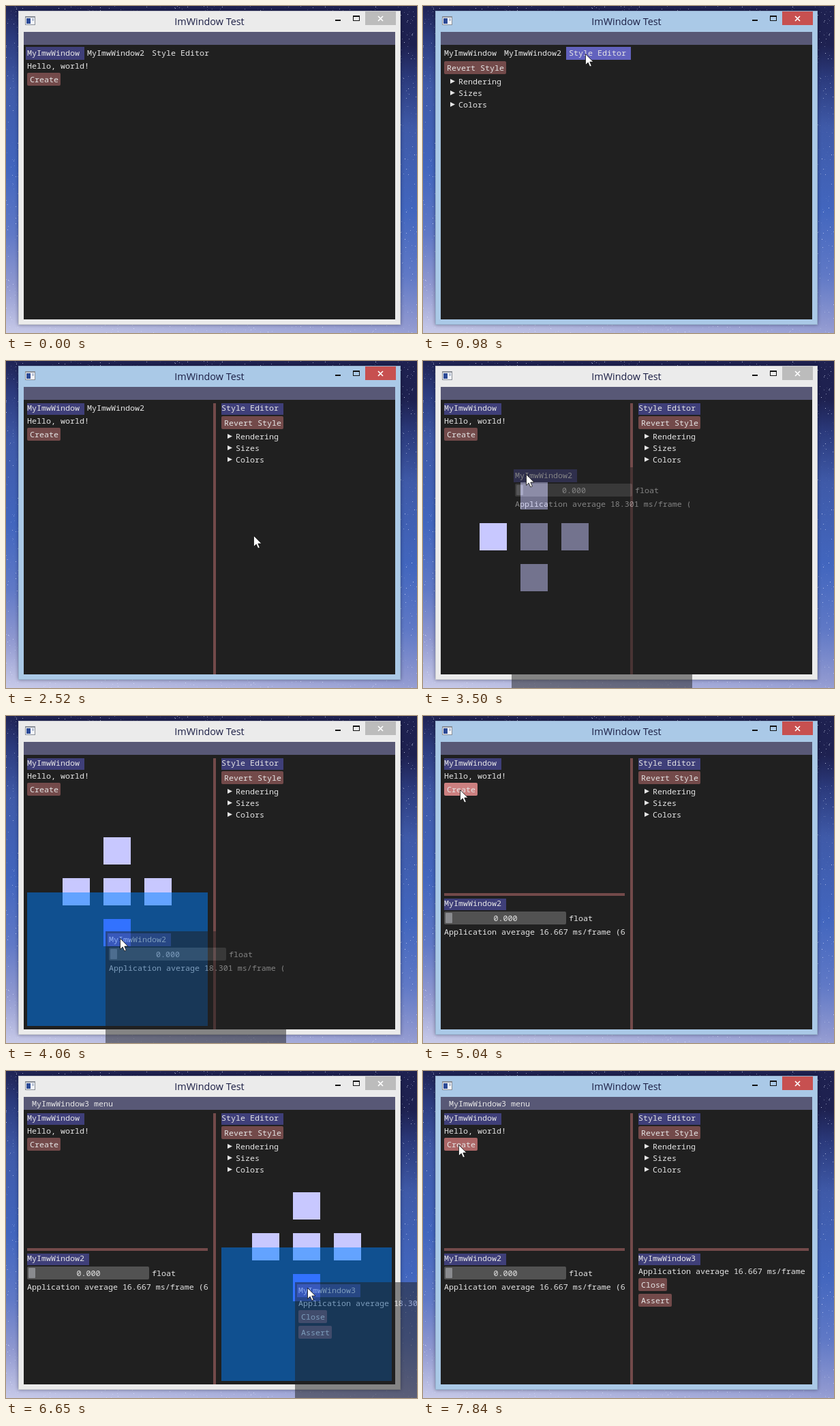
Animation of 603 by 480 pixels, one loop 8000 ms. Source, as an HTML page with a canvas:

```html
<!DOCTYPE html>
<html lang="en">
<head>
<meta charset="utf-8">
<title>ImWindow Test</title>
<style>
  html, body { margin: 0; width: 100%; height: 100%; overflow: hidden; background: #3d5fb8; }
  canvas { display: block; }
</style>
</head>
<body>
<canvas id="stage" width="603" height="480"></canvas>
<script>
const W = 603, H = 480, LOOP = 8000, STEP = 70, CHAR = 7;
const COLOR = {
  body: '#202020', menu: '#585876', text: '#e6e6e6', bar: '#734a4a',
  button: ['#734a4a', '#ab6666', '#cc8080'],
  tab: ['#3f3f79', '#6262be', '#7272b8'],
  slider: '#525252', grab: '#8a8b8f', guide: '#c8c8ff', guideHot: '#6464ff'
};
const MONO = '11.667px "Noto Sans Mono", "Liberation Mono", monospace';
const SANS = '14.4px "Open Sans", "Noto Sans", sans-serif';

const stage = document.getElementById('stage').getContext('2d');
const newLayer = () => Object.assign(document.createElement('canvas'), { width: W, height: H }).getContext('2d');
const layer = newLayer();
const sky = paintSky(newLayer());
let ctx = stage, cursor = null, pressed = false;

// Pointer path: time, x, y
const PATH = [
  [70, 186, 68], [140, 178, 68], [420, 178, 68], [700, 238, 70], [1050, 238, 70], [1260, 258, 70],
  [1400, 258, 70], [1750, 359, 160], [2170, 363, 256], [2660, 363, 256], [3150, 140, 69],
  [3290, 140, 69], [3850, 168, 328], [3920, 168, 328], [4060, 167, 326], [4550, 167, 326],
  [4970, 54, 108], [5250, 54, 108], [5740, 166, 110], [5810, 168, 111], [5880, 190, 135],
  [6020, 320, 260], [6090, 345, 276], [6650, 442, 318], [6790, 442, 318], [7350, 52, 117],
  [7700, 52, 117], [7840, 52, 108], [8000, 52, 108]
];

const between = (t, a, b) => t >= a && t < b;

function pointerAt(t) {
  const i = PATH.findIndex(p => p[0] > t);
  if (i < 1) return null;
  const [t0, x0, y0] = PATH[i - 1], [t1, x1, y1] = PATH[i];
  const k = (t - t0) / (t1 - t0);
  return { x: Math.round(x0 + (x1 - x0) * k), y: Math.round(y0 + (y1 - y0) * k) };
}

function paintSky(c) {
  let seed = 7;
  const random = () => (seed = seed * 16807 % 2147483647) / 2147483647;
  const g = c.createLinearGradient(50, 0, 0, H);
  [[0, '#1e2150'], [.1, '#2b3a7c'], [.25, '#3f5aa8'], [.5, '#4266be'], [.7, '#6079c6'],
   [.85, '#8f98d0'], [1, '#c8cae8']].forEach(s => g.addColorStop(...s));
  c.fillStyle = g;
  c.fillRect(0, 0, W, H);
  for (let i = 0; i < 9000; i++) {
    const x = random() * W, y = random() * H;
    c.fillStyle = `rgba(225,232,255,${random() ** 4 * .8})`;
    c.fillRect(x | 0, y | 0, 1, 1);
  }
  return c.canvas;
}

function rect(x, y, w, h, color, radius = 0) {
  ctx.fillStyle = color;
  ctx.beginPath();
  ctx.roundRect(x, y, w, h, radius);
  ctx.fill();
}

function text(s, x, y, color = COLOR.text) {
  ctx.font = MONO;
  ctx.fillStyle = color;
  ctx.fillText(s, x, y + 4);
}

function poly(points, color) {
  ctx.fillStyle = color;
  ctx.beginPath();
  points.forEach(p => ctx.lineTo(...p));
  ctx.closePath();
  ctx.fill();
}

// Draws a group on its own layer, then blends it as a whole.
function blended(alpha, draw) {
  layer.clearRect(0, 0, W, H);
  ctx = layer;
  draw();
  ctx = stage;
  ctx.globalAlpha = alpha;
  ctx.drawImage(layer.canvas, 0, 0);
  ctx.globalAlpha = 1;
}

const inside = (x, y, w, h) => cursor &&
  cursor.x >= x && cursor.x < x + w && cursor.y >= y && cursor.y < y + h;
const heat = (...box) => inside(...box) ? (pressed ? 2 : 1) : 0;

function button(label, x, y) {
  const box = [x, y - 10, label.length * CHAR + 7, 19];
  rect(...box, COLOR.button[heat(...box)], 2);
  text(label, x + 4, y);
}

const average = rate => `Application average ${rate} FPS)`;

// Each window body starts at the text position of its tab.
const WINDOWS = {
  MyImwWindow(x, y) {
    text('Hello, world!', x, y + 19);
    button('Create', x, y + 39);
  },
  MyImwWindow2(x, y, w, rate) {
    const sw = Math.round(w * .65);
    rect(x, y + 12, sw, 19, COLOR.slider, 2);
    rect(x + 2, y + 14, 10, 15, COLOR.grab, 1);
    text('0.000', x + sw / 2 - 17, y + 22);
    text('float', x + sw + 4, y + 22);
    text(average(rate), x, y + 42);
  },
  'Style Editor'(x, y) {
    button('Revert Style', x, y + 22);
    ['Rendering', 'Sizes', 'Colors'].forEach((name, i) => {
      const cy = y + 42 + i * 17;
      poly([[x + 9, cy - 4], [x + 16, cy - .5], [x + 9, cy + 3]], COLOR.text);
      text(name, x + 21, cy);
    });
  },
  MyImwWindow3(x, y, w, rate) {
    text(average(rate), x, y + 19);
    button('Close', x, y + 39);
    button('Assert', x, y + 62);
  }
};

function pane(x, y, w, h, tabs, selected, { loose = false, held = false, rate = '16.667 ms/frame (60.0' } = {}) {
  const inset = loose ? 3 : 5;
  ctx.save();
  ctx.beginPath();
  ctx.rect(x + inset, y + inset, w - inset - 4, h - inset);
  ctx.clip();
  let tx = x + 5;
  const ty = y + 12;
  for (const name of tabs) {
    const width = name.length * CHAR + 7;
    const box = [tx - 4, ty - 9, width + 4, 19];
    const level = held ? 2 : heat(...box);
    if (name === selected || level) rect(...box, COLOR.tab[level]);
    text(name, tx, ty);
    tx += width + 4;
  }
  WINDOWS[selected](x + 5, ty, w, rate);
  ctx.restore();
}

function frame(x, y, w, h, title, active) {
  const r = x + w;
  ctx.save();
  ctx.shadowColor = 'rgba(0,0,20,.4)';
  ctx.shadowBlur = 5;
  rect(x, y, w, h, active ? '#aac9e7' : '#ebebeb');
  ctx.restore();
  ctx.strokeStyle = 'rgba(60,70,90,.2)';
  ctx.strokeRect(x + .5, y + .5, w - 1, h - 1);
  // Generic window icon
  rect(x + 10, y + 8, 15, 13, '#8a8f98');
  rect(x + 11, y + 10, 13, 10, '#f4f6fa');
  rect(x + 12, y + 11, 6, 8, '#2c4a96');
  rect(x + 20, y + 11, 3, 4, '#b9c2d4');
  ctx.font = SANS;
  ctx.textAlign = 'center';
  ctx.fillStyle = '#1c1f45';
  ctx.fillText(title, x + w / 2, y + 21);
  ctx.textAlign = 'left';
  rect(r - 96, y + 13, 8, 2, '#111');
  ctx.strokeStyle = '#111';
  ctx.strokeRect(r - 69.5, y + 7.5, 9, 7);
  rect(r - 70, y + 7, 10, 2, '#111');
  rect(r - 52, y + 1, 45, 20, active ? '#c75050' : '#bcbcbc');
  ctx.strokeStyle = '#fff';
  ctx.lineWidth = 1.7;
  ctx.beginPath();
  for (const d of [-1, 1]) {
    ctx.moveTo(r - 29.5 - 3.5 * d, y + 8);
    ctx.lineTo(r - 29.5 + 3.5 * d, y + 15);
  }
  ctx.stroke();
  ctx.lineWidth = 1;
  rect(x + 8, y + 31, w - 16, h - 39, COLOR.body);
}

function guides(x, y, w, h) {
  const cx = Math.floor(x + w / 2), cy = Math.floor(y + h / 2);
  let target = null;
  for (const [dx, dy] of [[0, 0], [0, -1], [0, 1], [-1, 0], [1, 0]]) {
    const box = [cx + dx * 60 - 20, cy + dy * 60 - 20, 40, 40];
    const hot = inside(...box);
    if (hot) target = [dx, dy];
    rect(...box, hot ? COLOR.guideHot : COLOR.guide);
  }
  if (!target) return;
  const [dx, dy] = target;
  const left = dx > 0 ? cx : x + 5, right = dx < 0 ? cx : x + w - 5;
  const top = dy > 0 ? cy + 1 : y + 5, bottom = dy < 0 ? cy : y + h - 5;
  rect(left, top, right - left, bottom - top, 'rgba(0,128,255,.5)');
}

function ghost(name, w, h, dx, dy, rate) {
  const x = cursor.x - dx, y = cursor.y - dy;
  blended(.5, () => {
    rect(x, y, w, h, COLOR.body);
    const pointer = cursor;
    cursor = null;
    pane(x, y, w, h, [name], name, { loose: true, rate });
    cursor = pointer;
  });
}

function mainWindow(t, drag) {
  const active = between(t, 280, 1470) || between(t, 2520, 3360) || between(t, 4200, 5180) || t >= 6860;
  const A = 'MyImwWindow', B = 'MyImwWindow2', S = 'Style Editor', C = 'MyImwWindow3';
  frame(18, 7, 561, 461, 'ImWindow Test', active);
  rect(26, 38, 545, 19, COLOR.menu);
  if (t >= 5180) text('MyImwWindow3 menu', 38, 48);

  // While a tab is dragged, nothing underneath reacts to the pointer.
  const pointer = cursor;
  if (drag) cursor = null;
  if (t < 2520) {
    const selected = t < 350 ? A : t < 980 ? B : t < 1470 ? S : B;
    pane(26, 57, 545, 403, drag ? [A, B] : [A, B, S], selected, { loose: true });
  } else {
    rect(304, 62, 4, 398, COLOR.bar);
    pane(311, 57, 260, t < 6860 ? 403 : 202, [S], S);
    if (t < 4200) {
      pane(26, 57, 275, 403, drag ? [A] : [A, B], A);
    } else {
      pane(26, 57, 275, 202, [A], A);
      rect(31, 260, 265, 4, COLOR.bar);
      pane(26, 263, 275, 197, [B], B);
    }
    if (t >= 6860) {
      rect(316, 260, 250, 4, COLOR.bar);
      pane(311, 263, 260, 197, [C], C);
    }
  }
  cursor = pointer;

  if (drag === 1) guides(26, 57, 545, 403);
  if (drag === 2) guides(26, 57, 275, 403);
  if (drag === 3 && t >= 6020) guides(311, 57, 260, 403);
}

function popup(t) {
  const alpha = t < 6020 ? 1 : t < 6090 ? .92 : .45;
  blended(alpha, () => {
    frame(141, 70, 314, 336, 'ImwWindow', false);
    pane(148, 100, 299, 299, ['MyImwWindow3'], 'MyImwWindow3',
      { loose: true, held: t >= 5810, rate: '7.626 ms/frame (131.1' });
  });
}

function arrow({ x, y }) {
  const shape = [[0, 0], [0, 16], [3.7, 12.6], [6.3, 18.5], [8.8, 17.4], [6.3, 11.6], [11.4, 11.6]]
    .map(([dx, dy]) => [x + dx + .5, y + dy + .5]);
  poly(shape, '#fff');
  ctx.strokeStyle = '#111';
  ctx.lineWidth = .8;
  ctx.stroke();
  ctx.lineWidth = 1;
}

function draw(now) {
  const t = Math.floor((now % LOOP) / STEP) * STEP;
  const drag = between(t, 1470, 2520) ? 1 : between(t, 3360, 4200) ? 2 : between(t, 5880, 6860) ? 3 : 0;
  cursor = pointerAt(t);
  pressed = between(t, 280, 350) || between(t, 840, 980) || between(t, 5040, 5180);

  ctx.drawImage(sky, 0, 0);
  mainWindow(t, drag);
  if (between(t, 5180, 6160)) popup(t);
  if (drag === 1) ghost('Style Editor', 535, 393, 22, 9);
  if (drag === 2) ghost('MyImwWindow2', 265, 393, 21, 10, '18.301 ms/frame (54.6');
  if (drag === 3) ghost('MyImwWindow3', 290, 289, 18, 8, '18.301 ms/frame (54.6');
  if (cursor) arrow(cursor);
}

const start = performance.now();
function tick() {
  draw(performance.now() - start);
  requestAnimationFrame(tick);
}
tick();
</script>
</body>
</html>
```
